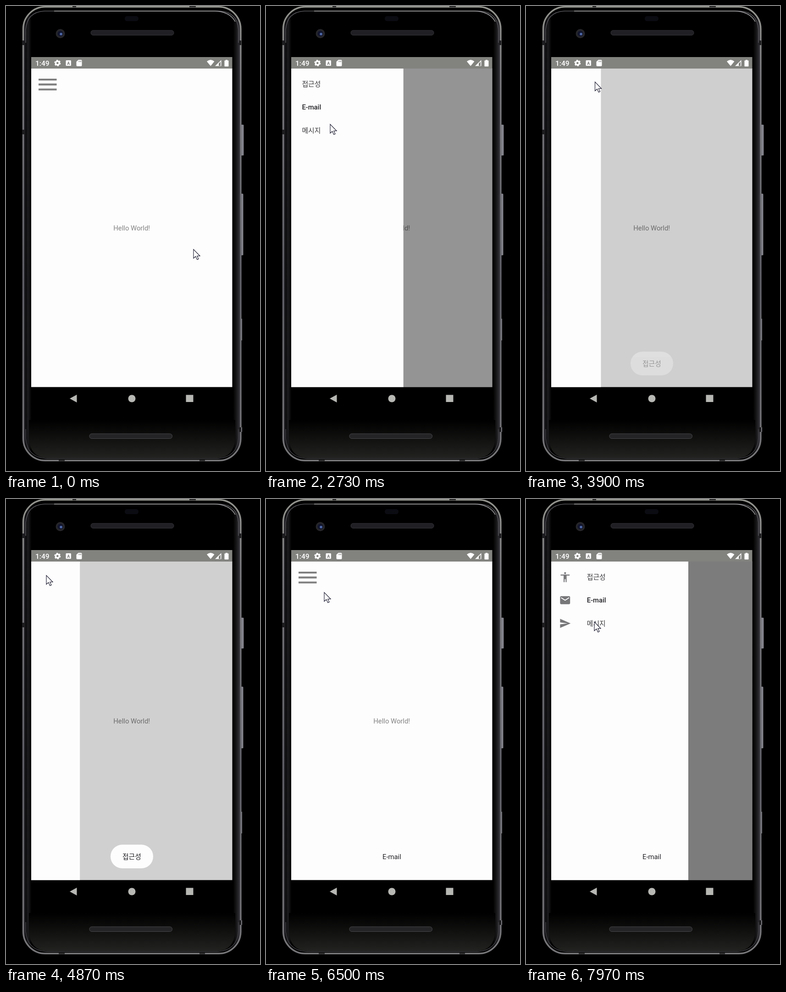
Recreate the animation shown at these times as an HTML page. Size 554x1011 px, loop 8 s.

```html
<!DOCTYPE html>
<html lang="ko">
<head>
<meta charset="utf-8">
<title>Navigation drawer</title>
<style>
html, body { margin: 0; width: 100%; height: 100%; overflow: hidden; background: #000; }
svg { display: block; width: 100vw; height: 100vh; }
text { font: 14.8px Roboto, "Noto Sans CJK KR", "Noto Sans CJK", sans-serif; fill: #202024; }
.medium { font-weight: 500; }
.hangul { font-weight: 400; fill: #38383a; }
</style>
</head>
<body>
<svg viewBox="0 0 554 1011">
  <defs>
    <linearGradient id="side">
      <stop offset="0" stop-color="#3c3c44"/>
      <stop offset=".012" stop-color="#0a0a0c"/>
      <stop offset=".022" stop-color="#1d1d20"/>
      <stop offset=".038" stop-color="#000"/>
      <stop offset=".965" stop-color="#000"/>
      <stop offset=".982" stop-color="#1a1a1c"/>
      <stop offset="1" stop-color="#3c3c44"/>
    </linearGradient>
    <linearGradient id="chin" x2="0" y2="1">
      <stop offset="0" stop-color="#000"/>
      <stop offset="1" stop-color="#222220"/>
    </linearGradient>
    <linearGradient id="rim" x2="0" y2="1">
      <stop offset="0" stop-color="#94948f"/>
      <stop offset=".15" stop-color="#7c7c80"/>
      <stop offset=".6" stop-color="#62626a"/>
      <stop offset="1" stop-color="#77777a"/>
    </linearGradient>
    <clipPath id="screen"><path d="M55 136h438.500v692.500H55z"/></clipPath>
  </defs>
  <rect width="554" height="1011"/>

  <!-- Phone body -->
  <g fill="#83838c">
    <rect x="512" y="258" width="6.500" height="67" rx="1.500"/>
    <rect x="512" y="408" width="5.500" height="134" rx="1.500"/>
    <rect x="512" y="680" width="3" height="47"/>
    <rect x="512" y="916" width="3" height="10"/>
  </g>
  <rect x="37.500" y="1.800" width="474.500" height="986.500" rx="48" fill="url(#side)" stroke="url(#rim)" stroke-width="3.400"/>
  <path d="M50 900H500V940Q498 981 460 983H90Q52 981 50 940Z" fill="url(#chin)"/>
  <path d="M43 80V52Q45 13 84 11H466Q505 13 507 52V80" fill="none" stroke="#55555a" stroke-width="1.500"/>
  <path d="M105 11H455Q488 12 500 34" fill="none" stroke="#a5a5a8" stroke-width="1.500"/>
  <path d="M43 920V940Q46 981 88 984H462Q504 981 507 940V920" fill="none" stroke="#3f3f44" stroke-width="1.500"/>
  <path d="M36 80h5M36 274h5M508 80h5M508 921h5" stroke="#1d1d20" stroke-width="10"/>
  <path d="M145 1h8M400 1h14M115 988h13M422 988h12" stroke="#222" stroke-width="3"/>
  <rect x="259" y="22" width="30" height="11" rx="5" fill="#0b0b12"/>
  <rect x="185" y="53" width="181" height="10.500" rx="5" fill="#202024" stroke="#34343a"/>
  <rect x="182" y="930" width="180.500" height="10.500" rx="5" fill="#242426" stroke="#46464a"/>
  <circle cx="118.500" cy="60" r="10" fill="#26262a"/>
  <circle cx="118.500" cy="60" r="6" fill="#11152d"/>
  <circle cx="120" cy="61" r="2.800" fill="#506aa8"/>

  <!-- Status bar -->
  <path d="M55 111h438.500v26H55z" fill="#82827f"/>
  <text x="64" y="129.800" class="medium" style="font-size:15.500px;fill:#fff">1:49</text>
  <g fill="#fff">
    <circle cx="112.300" cy="124" r="4" fill="none" stroke="#fff" stroke-width="3.400"/>
    <circle cx="112.300" cy="124" r="6.100" fill="none" stroke="#fff" stroke-width="2" stroke-dasharray="3.200 3.188"/>
    <rect x="130.500" y="118" width="11.500" height="12" rx="1.500"/>
    <path d="M158 117h5.500q2 0 2 2v10q0 2-2 2h-8q-2 0-2-2v-8z"/>
    <path d="M159 119v3M161.300 119v3M163.500 119v3" stroke="#82827f"/>
    <path d="M438 120.500Q446.300 113.500 454.500 120.500L446.300 130.500Z"/>
    <path d="M456 130.500L469.500 117.500V130.500Z"/>
    <path d="M464 125v5h4v-9z" fill="#82827f"/>
    <path d="M479 117h4v1.500h2.500v12q0 1-1 1h-7q-1 0-1-1v-12h2.500z"/>
  </g>
  <text x="136.300" y="127.500" text-anchor="middle" style="font-size:9px;font-weight:700;fill:#777">A</text>

  <!-- App -->
  <g clip-path="url(#screen)">
    <path d="M55 136h439v693H55z" fill="#fdfdfe"/>
    <path d="M71 160h39.500M71 170.700h39.500M71 181.500h39.500" stroke="#7f7f7f" stroke-width="4.200"/>
    <text x="274.200" y="488" text-anchor="middle" style="fill:#838383">Hello World!</text>
    <path id="scrim" d="M55 136h439v693H55z"/>
    <g id="drawer">
      <path d="M55 136h299v693H55z" fill="#fdfdfe"/>
      <g id="menu" fill="#77777a"></g>
    </g>
    <g id="toast">
      <rect x="228" y="751.500" width="93" height="51.500" rx="25.700" fill="#fdfdfe"/>
      <text id="message" x="274.400" y="782.700" text-anchor="middle"></text>
    </g>
  </g>

  <!-- Navigation bar -->
  <g fill="#b7b7b4">
    <path d="M139 853.500L154.500 845V862Z"/>
    <circle cx="274.500" cy="853.500" r="8"/>
    <path d="M392.500 845.500h16v15.500h-16z"/>
  </g>
  <path id="cursor" d="M0 0V19.500L4.600 15.500L8 22.500L11 21L7.800 14.500H14Z" fill="#fff" stroke="#15152a" stroke-width="1.100"/>
</svg>
<script>
const LOOP = 8000, LEFT = 55, WIDTH = 299;
const $ = id => document.getElementById(id);
const clamp = v => Math.min(1, Math.max(0, v));
const ramp = (t, start, length) => clamp((t - start) / length);

const ITEMS = [
  ['접근성', 'hangul', 'M12 2c1.100 0 2 .9 2 2s-.9 2-2 2-2-.9-2-2 .9-2 2-2zm9 7h-6v13h-2v-6h-2v6H9V9H3V7h18z'],
  ['E-mail', 'medium', 'M20 4H4c-1.100 0-2 .9-2 2v12c0 1.100.9 2 2 2h16c1.100 0 2-.9 2-2V6c0-1.100-.9-2-2-2zm0 4l-8 5-8-5V6l8 5 8-5z'],
  ['메시지', 'hangul', 'M2 21L23 12 2 3v7l15 2-15 2z']
];
$('menu').innerHTML = ITEMS.map(([label, style, icon], i) => {
  const y = 169.700 + i * 50.300;
  return `<path d="${icon}" transform="translate(72.200 ${y - 13}) scale(1.090)"/>
    <text class="${style}" x="132.800" y="${y + 5.300}">${label}</text>`;
}).join('');

// Pointer stops: time, x, y
const PATH = [
  [30, 409, 529], [480, 62, 420], [900, 345, 400], [1430, 345, 400],
  [1700, 6, 330], [1860, 40, 120], [1970, 76, 145], [2170, 86, 166],
  [2520, 86, 166], [2730, 140, 257], [3130, 150, 250], [3600, 150.500, 165],
  [3970, 150.500, 165], [4530, 88, 166], [4900, 88, 166], [5340, 152, 226],
  [5440, 154, 220], [5600, 154, 220], [5700, 150, 207], [5950, 150, 207],
  [6500, 127, 203], [6900, 88, 166], [7200, 88, 166], [7970, 149, 267]
];
function pointer(t) {
  const i = PATH.findIndex(p => p[0] > t);
  if (i === 0) return PATH[0].slice(1);
  if (i < 0) return PATH[PATH.length - 1].slice(1);
  const [t0, x0, y0] = PATH[i - 1], [t1, x1, y1] = PATH[i];
  const u = (t - t0) / (t1 - t0), e = u * u * (3 - 2 * u);
  return [x0 + (x1 - x0) * e, y0 + (y1 - y0) * e];
}

const settle = (t, start) => 1 - (1 - ramp(t, start, 512)) ** 5;
function openness(t, x) {
  if (t < 480) return 0;
  if (t < 900 || (t >= 1430 && t < 1700)) return clamp((x + 9 - LEFT) / WIDTH); // dragged
  if (t < 1430) return 1;
  return settle(t, 2583) - settle(t, 3807) + settle(t, 4828)
    - settle(t, 5830) + settle(t, 7100);
}

function draw(t) {
  const [x, y] = pointer(t), open = openness(t, x);
  $('cursor').setAttribute('transform', `translate(${x} ${y})`);
  $('drawer').setAttribute('transform', `translate(${(open - 1) * WIDTH} 0)`);
  $('scrim').setAttribute('opacity', open * .51);
  const second = t >= 5950;
  $('message').textContent = ITEMS[second ? 1 : 0][0];
  $('toast').setAttribute('opacity', second
    ? ramp(t, 5980, 200)
    : ramp(t, 3830, 220) - ramp(t, 5840, 100));
}

function tick() {
  draw(performance.now() % LOOP);
  requestAnimationFrame(tick);
}
tick();
</script>
</body>
</html>
```
